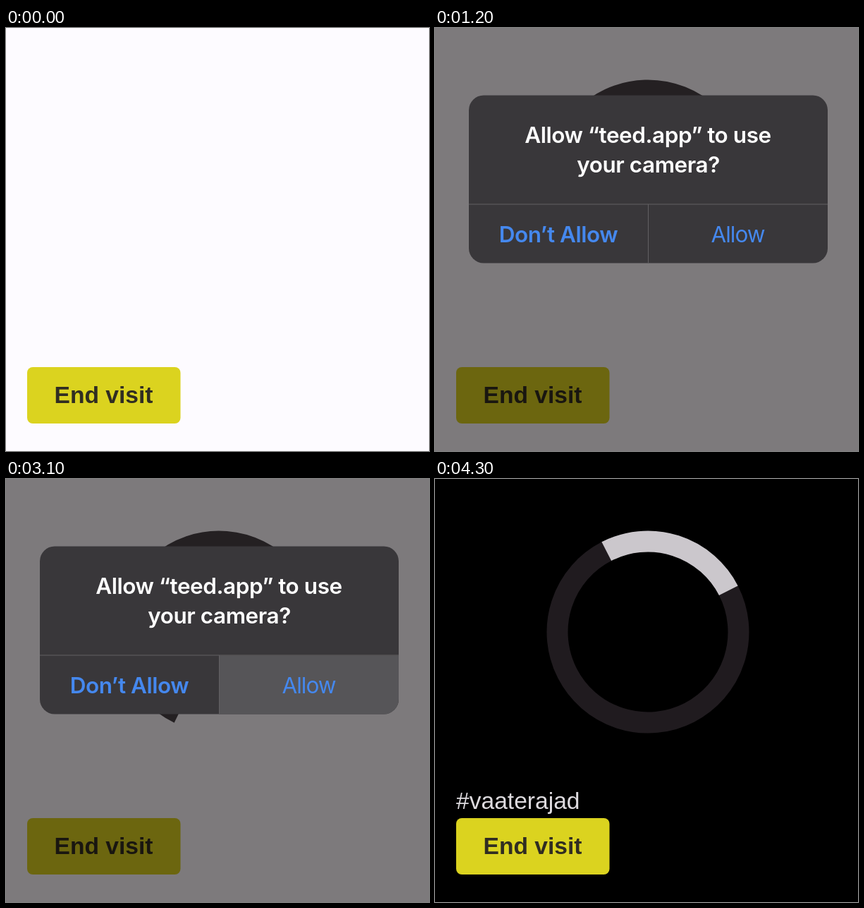
Recreate the animation shown at these times as an HTML page. Size 600 px wide and 600 px high, loop 4400 ms.

```html
<!DOCTYPE html>
<html lang="en">
<head>
<meta charset="utf-8">
<title>Camera permission</title>
<style>
  html, body { margin: 0; width: 100%; height: 100%; overflow: hidden; background: #fdfbff; }
  svg { display: block; width: 100vw; height: 100vh; }
  .ui { font: 600 31.5px Inter, Roboto, sans-serif; letter-spacing: -.45px; text-anchor: middle; fill: #fff; }
  .action { fill: #4588ee; }
  .plain { font-weight: 400; letter-spacing: -1px; }
  .page { font: 33.6px "Liberation Sans", sans-serif; }
  .label { font-weight: 700; fill: #302d22; }
  .ring circle { fill: none; stroke-width: 30; }
</style>
</head>
<body>
<svg viewBox="0 0 600 600" xmlns="http://www.w3.org/2000/svg">
  <rect id="bg" width="600" height="600"/>
  <g id="ring" class="ring">
    <circle id="track" r="128.5" pathLength="360" stroke-dasharray="270 90"/>
    <circle id="head" r="128.5" pathLength="360" stroke="#cbc7cc" stroke-dasharray="0 270 90 0"/>
  </g>
  <text id="tag" class="page" x="30" y="468" fill="#dedbdf">#vaaterajad</text>
  <rect x="30" y="481" width="217.5" height="80" rx="8" fill="#dbd31f"/>
  <text class="page label" x="68.5" y="532">End visit</text>
  <rect id="dim" width="600" height="600" fill="#040000"/>
  <g id="dialog">
    <rect x="48" y="95.5" width="509" height="238" rx="21" fill="#39373a"/>
    <path id="press" d="M303 250.5H557V312.5a21 21 0 0 1 -21 21H303Z" fill="#565558"/>
    <path d="M48 250H557M302.5 250V333" fill="none" stroke="#626063"/>
    <g class="ui">
      <text x="302" y="163">Allow “teed.app” to use</text>
      <text x="302.5" y="205">your camera?</text>
      <text class="action" x="175" y="304">Don’t Allow</text>
      <text class="action plain" x="429.5" y="304">Allow</text>
    </g>
  </g>
</svg>
<script>
const LOOP = 4400, STEP = 100;
const SPIN_START = 200, PRESS = 3000, CAMERA = 4100;
const CX = 302, CY = 217;

const el = id => document.getElementById(id);
const set = (id, attrs) => {
  for (const name in attrs) el(id).setAttribute(name, attrs[name]);
};
const show = (id, on) => set(id, { visibility: on ? "visible" : "hidden" });
const progress = (t, from, to) => Math.min(1, Math.max(0, (t - from) / (to - from)));
const easeOut = p => 1 - (1 - p) ** 2;

function draw(t) {
  const camera = t >= CAMERA;
  const enter = easeOut(progress(t, 300, 600));
  const leave = easeOut(progress(t, 3100, 3400));
  const alpha = enter * (1 - leave);
  const scale = 1.12 - 0.12 * enter;
  const angle = 116.2 + 0.1805 * (t - 3100);

  set("bg", { fill: camera ? "#000" : "#fdfbff" });
  set("ring", { transform: `translate(${CX} ${CY}) rotate(${angle})` });
  set("track", { stroke: camera ? "#201b1f" : "#464247" });
  show("ring", t >= SPIN_START);
  show("head", camera);
  show("tag", camera);

  set("dim", { opacity: 0.515 * alpha });
  set("dialog", {
    opacity: alpha,
    transform: `translate(302.5 214.5) scale(${scale}) translate(-302.5 -214.5)`
  });
  set("press", { opacity: t >= PRESS ? 1 : 0 });
}

const start = performance.now();
function tick() {
  const t = (performance.now() - start) % LOOP;
  draw(Math.floor(t / STEP) * STEP);
  requestAnimationFrame(tick);
}
tick();
</script>
</body>
</html>
```
